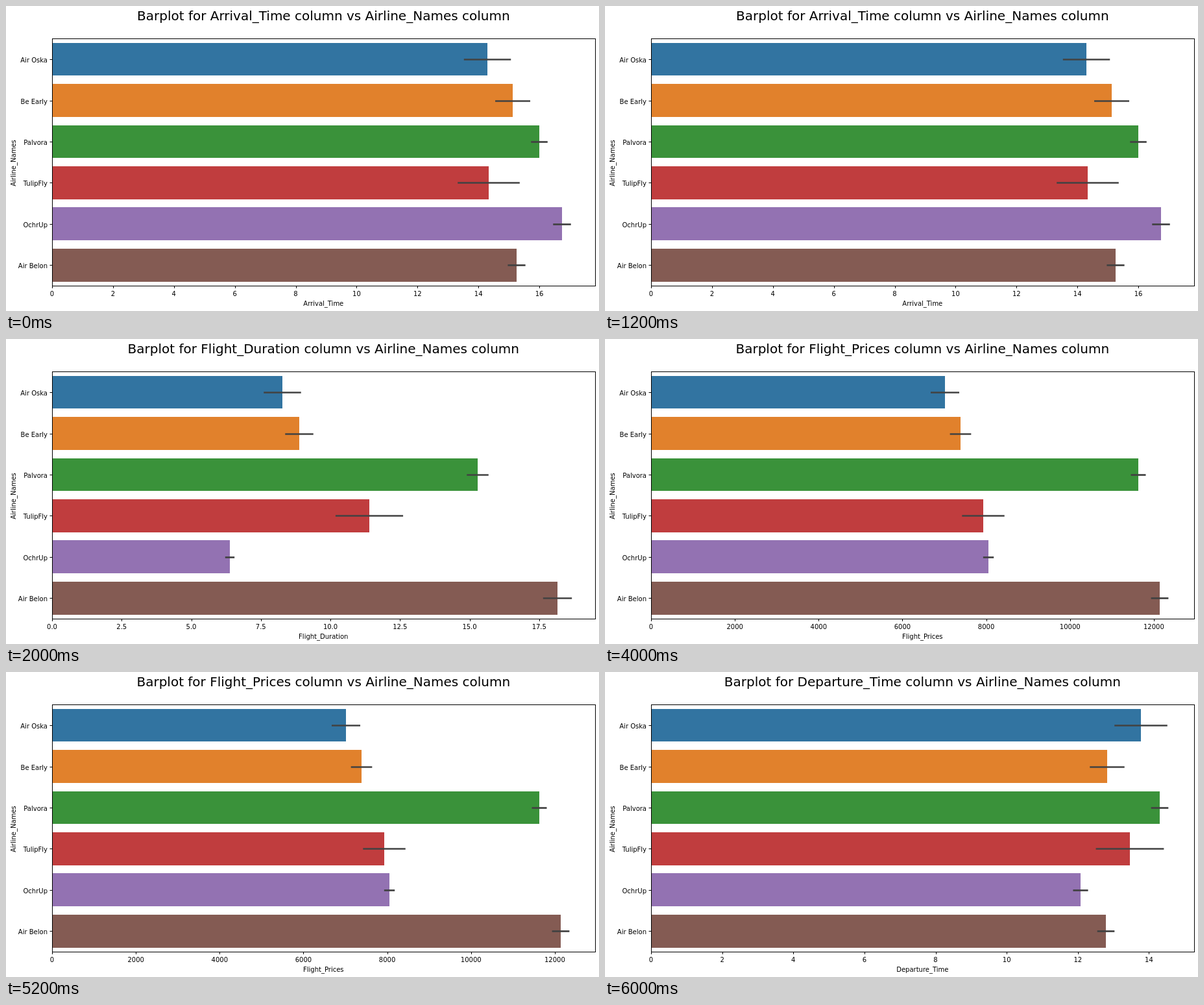
Recreate the animation shown at these times as an HTML page. Size 914x470 px, loop 8000 ms.

```html
<!DOCTYPE html>
<html lang="en">
<head>
<meta charset="utf-8">
<title>Airline bar plots</title>
<style>
  html, body { margin: 0; width: 100%; height: 100%; overflow: hidden; background: #fff; }
  svg { display: block; font: 10px "DejaVu Sans", sans-serif; }
  .title { font-size: 20px; }
  .bar { shape-rendering: crispEdges; }
  .axis { fill: none; stroke: #000; stroke-width: 1; }
  .error { stroke: #424242; stroke-width: 2.7; }
</style>
</head>
<body>
<svg id="stage" width="914" height="470" viewBox="0 0 914 470"></svg>
<script>
const HOLD = 2000;
const LEFT = 71, WIDTH = 837, TOP = 50, HEIGHT = 381, MID = 489.3;
const BOTTOM = TOP + HEIGHT;

// error: half length of the error line relative to the bar
const airlines = [
  { name: "Air Oska", color: "#3274a1", error: 0.054 },
  { name: "Be Early", color: "#e1812c", error: 0.038 },
  { name: "Palvora", color: "#3a923a", error: 0.017 },
  { name: "TulipFly", color: "#c03d3e", error: 0.071 },
  { name: "OchrUp", color: "#9372b2", error: 0.0175 },
  { name: "Air Belon", color: "#845b53", error: 0.019 }
];

// spread scales the error lines of a whole plot
const plots = [
  { name: "Arrival_Time", max: 17.83, step: 2, digits: 0, spread: 1,
    means: [14.3, 15.13, 16, 14.34, 16.75, 15.25] },
  { name: "Flight_Duration", max: 19.51, step: 2.5, digits: 1, spread: 1.5,
    means: [8.28, 8.88, 15.29, 11.4, 6.39, 18.16] },
  { name: "Flight_Prices", max: 12962, step: 2000, digits: 0, spread: 0.9,
    means: [7015, 7387, 11630, 7929, 8053, 12141] },
  { name: "Departure_Time", max: 15.27, step: 2, digits: 0, spread: 1,
    means: [13.78, 12.83, 14.31, 13.47, 12.08, 12.79] }
];

const stage = document.getElementById("stage");
const rowMid = i => Math.round(82.1 + 63.4 * i);

function add(parent, tag, attrs = {}, text = "") {
  const el = document.createElementNS("http://www.w3.org/2000/svg", tag);
  for (const key in attrs) el.setAttribute(key, attrs[key]);
  el.textContent = text;
  return parent.appendChild(el);
}

function line(parent, cls, d) {
  return add(parent, "path", { class: cls, d });
}

function label(parent, x, y, text, attrs = {}) {
  return add(parent, "text", { x, y, "text-anchor": "middle", ...attrs }, text);
}

function drawPlot({ name, max, step, digits, spread, means }) {
  const g = add(stage, "g");
  label(g, MID, 22, `Barplot for ${name} column vs Airline_Names column`, { class: "title" });
  label(g, MID, 462, name);

  airlines.forEach(({ color, error }, i) => {
    const width = Math.round(means[i] / max * WIDTH);
    const half = width * error * spread;
    const y = Math.round(56.6 + 63.45 * i);
    const bottom = Math.round(107.36 + 63.45 * i);
    add(g, "rect", { class: "bar", x: LEFT, y, width, height: bottom - y, fill: color });
    line(g, "error", `M${LEFT + width - half} ${rowMid(i) + 0.5}h${2 * half}`);
  });

  for (let v = 0; v < max; v += step) {
    const x = LEFT + v / max * WIDTH;
    line(g, "axis", `M${Math.round(x) + 0.5} ${BOTTOM}v4`);
    label(g, x, 447, v.toFixed(digits));
  }
  return g;
}

function drawFrame() {
  add(stage, "rect", { class: "axis", x: LEFT + 0.5, y: TOP + 0.5, width: WIDTH, height: HEIGHT });
  airlines.forEach(({ name }, i) => {
    const y = rowMid(i);
    line(stage, "axis", `M${LEFT} ${y + 0.5}h-3.5`);
    label(stage, 64, y + 5, name, { "text-anchor": "end" });
  });
  label(stage, 0, 0, "Airline_Names", { transform: "translate(15 242) rotate(-90)" });
}

const groups = plots.map(drawPlot);
drawFrame();

const loop = HOLD * plots.length;
groups.forEach((g, i) => {
  const anim = g.animate([
    { opacity: 1, offset: 0, easing: "step-end" },
    { opacity: 0, offset: 1 / plots.length, easing: "step-end" },
    { opacity: 0, offset: 1 }
  ], { duration: loop, iterations: Infinity, delay: i ? i * HOLD - loop : 0 });
  anim.startTime = 0;
});
</script>
</body>
</html>
```
